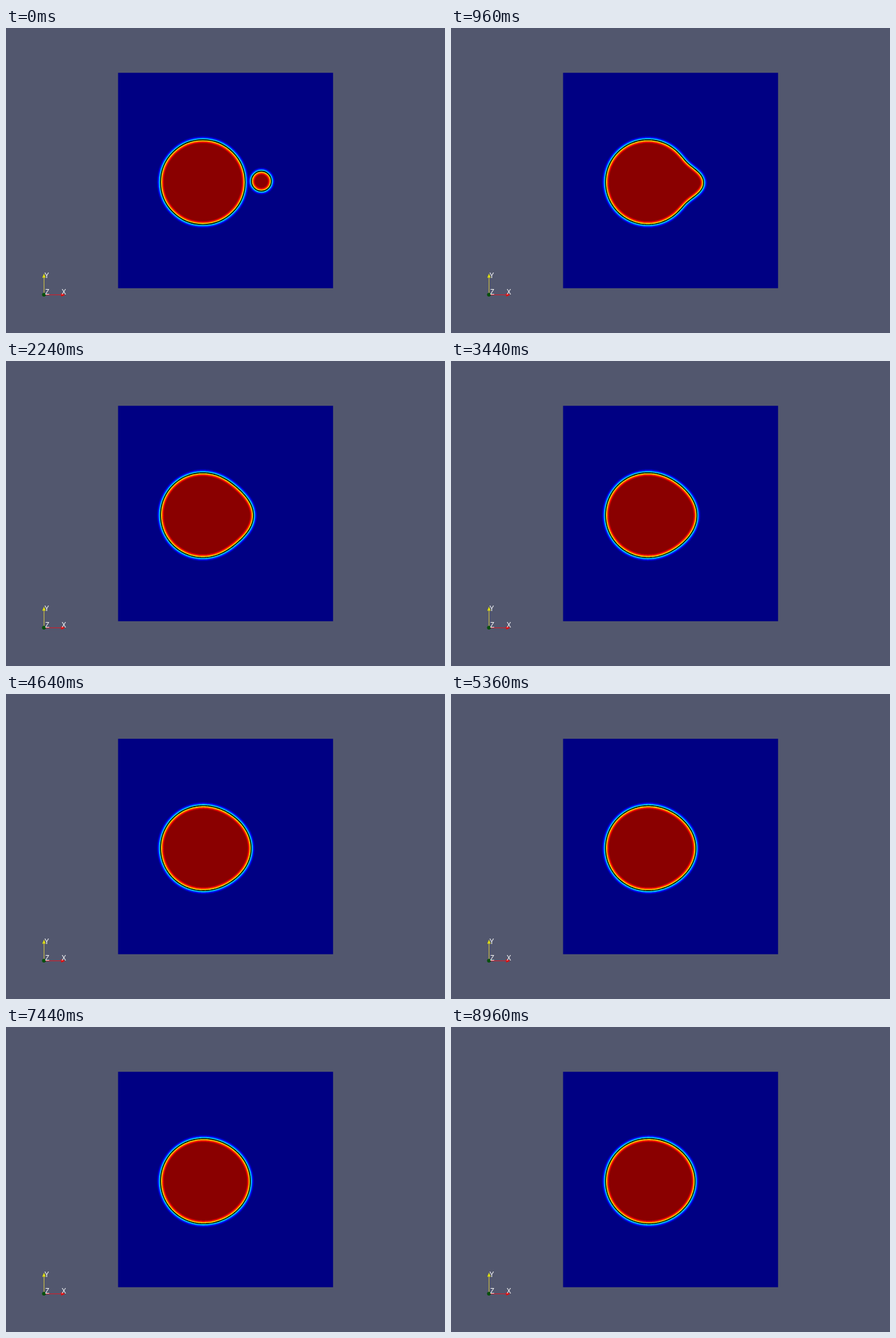
An HTML page with a canvas for the animation above (9.04 s loop, 640 by 444 pixels).

```html
<!DOCTYPE html>
<html lang="en">
<head>
<meta charset="utf-8">
<title>Merging droplets</title>
<style>
  html, body { margin: 0; width: 100%; height: 100%; overflow: hidden; background: #52576e; }
  canvas { display: block; }
</style>
</head>
<body>
<canvas id="stage" width="640" height="444"></canvas>
<script>
const ctx = document.getElementById('stage').getContext('2d');
const LOOP = 9040, STEP = 80, TAU = Math.PI * 2;
const BIG = { x: 287, y: 224.4, r: 61.7 };
const SMALL = { x: 372.3, y: 223, r: 14.5 };
const REACH = 6.5; // half thickness of the diffuse interface

function twoDrops() {
  const path = new Path2D();
  for (const { x, y, r } of [BIG, SMALL]) {
    path.moveTo(x + r, y);
    path.arc(x, y, r, 0, TAU);
  }
  return path;
}

// The absorbed droplet is a bump on the big circle that sinks and widens, keeping its area.
function mergedDrop(t) {
  const height = 5.5 + 15000 / Math.hypot(t, 460);
  const spread = 6.46 / height;
  const bluntness = 2 + 2 * Math.exp(-t / 300);
  const tilt = .012;
  const path = new Path2D();
  for (let a = -Math.PI; a < Math.PI; a += TAU / 240) {
    const r = BIG.r + height * Math.exp(-Math.pow(Math.abs(a - tilt) / spread, bluntness));
    path.lineTo(BIG.x + r * Math.cos(a), BIG.y + r * Math.sin(a));
  }
  path.closePath();
  return path;
}

function jet(v) {
  const ramp = (peak, low) => Math.round(255 * Math.max(low, Math.min(1, 1.5 - Math.abs(4 * v - peak))));
  return `rgb(${ramp(3, v > .5 ? .54 : 0)},${ramp(2, 0)},${ramp(1, v < .5 ? .515 : 0)})`;
}

// Colour at signed distance d from the outline (negative inside).
const shade = d => jet(.5 - .5 * Math.sin(d / REACH * Math.PI / 2));

function bands(path, side) {
  const step = .5;
  for (let d = REACH; d > 0; d -= step) {
    ctx.lineWidth = 2 * d;
    ctx.strokeStyle = shade(side * (d - step / 2));
    ctx.stroke(path);
  }
}

function drawDrop(path) {
  ctx.lineJoin = 'round';
  bands(path, 1);
  ctx.save();
  ctx.clip(path);
  ctx.fillStyle = jet(1);
  ctx.fill(path);
  bands(path, -1);
  ctx.restore();
  ctx.lineWidth = 1.4;
  ctx.strokeStyle = '#000';
  ctx.stroke(path);
}

// An axis drawn along x, turned by the given angle.
function arrow(angle, shaft, head) {
  ctx.save();
  ctx.translate(55.4, 388.4);
  ctx.rotate(angle);
  ctx.fillStyle = shaft;
  ctx.fillRect(2, -.5, 23, 1);
  ctx.fillStyle = head;
  ctx.beginPath();
  ctx.moveTo(31, 0);
  ctx.lineTo(25, -2.5);
  ctx.lineTo(25, 2.5);
  ctx.fill();
  ctx.restore();
}

function drawAxes() {
  arrow(-Math.PI / 2, '#c9bd45', '#dede10');
  arrow(0, '#d0202c', '#e80c0c');
  ctx.fillStyle = '#08500c';
  ctx.beginPath();
  ctx.arc(55.3, 388.2, 2.7, 0, TAU);
  ctx.fill();
  ctx.fillStyle = '#fff';
  ctx.font = '10px "Liberation Sans", sans-serif';
  ctx.fillText('Y', 56, 364);
  ctx.fillText('Z', 57, 388);
  ctx.fillText('X', 81, 388);
}

function draw(t) {
  ctx.fillStyle = '#52576e';
  ctx.fillRect(0, 0, 640, 444);
  ctx.fillStyle = jet(0);
  ctx.fillRect(163.4, 65.2, 313.4, 313.6);
  drawDrop(t < STEP ? twoDrops() : mergedDrop(t));
  drawAxes();
}

const begin = performance.now();
let shown = -1;
function tick() {
  const t = Math.floor((performance.now() - begin) % LOOP / STEP) * STEP;
  if (t !== shown) draw(shown = t);
  requestAnimationFrame(tick);
}
tick();
</script>
</body>
</html>
```
